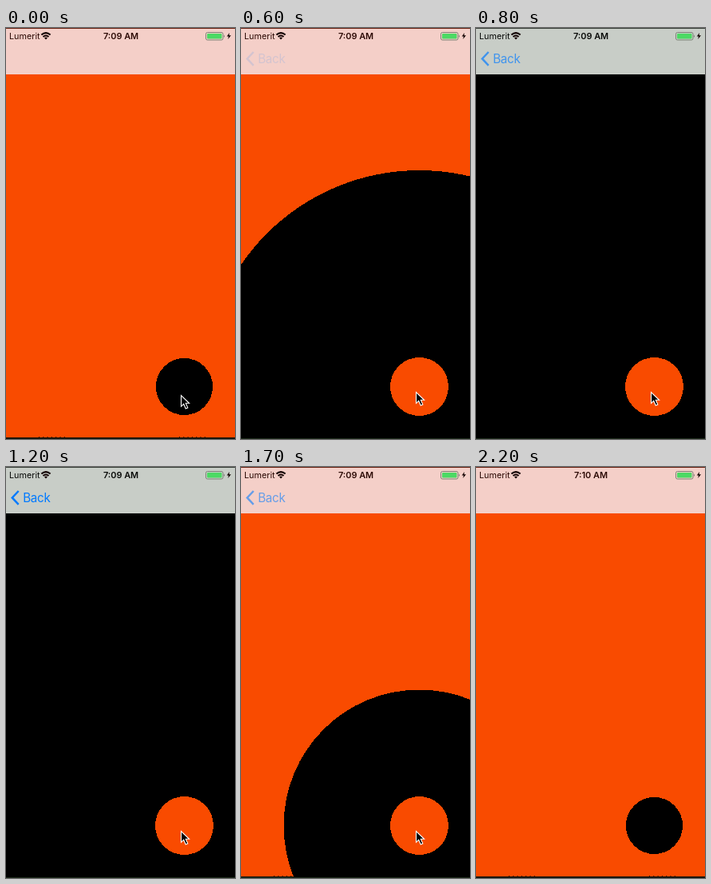
Animation, 287 px wide and 514 px high, one loop 2600 ms. Source, as an HTML page:

```html
<!DOCTYPE html>
<html lang="en">
<head>
<meta charset="utf-8">
<title>Circular reveal</title>
<style>
  html, body { margin: 0; width: 100%; height: 100%; overflow: hidden; background: #000; }
  svg { display: block; width: 100vw; height: 100vh; }
  text { font-family: Inter, "Liberation Sans", sans-serif; }
  .crisp { shape-rendering: crispEdges; }
</style>
</head>
<body>
<svg viewBox="0 0 287 514" preserveAspectRatio="none">
  <defs>
    <clipPath id="barClip"><rect width="287" height="58"/></clipPath>
    <filter id="soft" x="-10%" y="-10%" width="120%" height="120%"><feGaussianBlur stdDeviation="5"/></filter>
  </defs>

  <!-- Screens -->
  <rect width="287" height="514" fill="#f94b00"/>
  <path d="M41 511.5H74M217 511.5H250" stroke="#2a1000" stroke-dasharray="1 4.3"/>
  <rect y="512" width="287" height="2" fill="#1c160c"/>
  <circle id="reveal" class="crisp" cx="223.5" cy="448.5" r="35.6"/>
  <circle id="button" class="crisp" cx="223.5" cy="448.5" r="36.5" fill="#f94b00"/>
  <rect id="edge" y="513" width="287" height="1" fill="#1c2a1a"/>

  <!-- Translucent bar -->
  <g clip-path="url(#barClip)">
    <rect width="287" height="58" fill="#f4cfc8"/>
    <circle id="shade" cx="223.5" cy="448.5" r="0" fill="#c8cdc7" filter="url(#soft)"/>
  </g>
  <rect id="topLine" width="287" height="1" fill="#6b2415"/>

  <!-- Status bar -->
  <g id="status" fill="#2c0a05">
    <text x="4" y="14" font-size="10.8">Lumerit</text>
    <text id="clock" x="144" y="14" font-size="10.9" font-weight="600" text-anchor="middle">7:09 AM</text>
    <g fill="none" stroke="#100" stroke-width="2">
      <path d="M44.4 8.6Q50 3.6 55.6 8.6"/>
      <path d="M46.5 11Q50 8 53.5 11"/>
    </g>
    <path d="M48 12.3Q50 10.8 52 12.3L50 14.4Z" fill="#100"/>
    <rect x="250.5" y="5.5" width="21.5" height="9.5" rx="2" fill="none" stroke="#7d8376"/>
    <rect x="252" y="7" width="18.5" height="6.5" rx="1" fill="#4cd964"/>
    <path d="M273 8.4Q274.7 10.2 273 12Z" fill="#626258"/>
    <path d="M280 6L276.8 10.4H279L278.2 14L282 9.3H279.5Z" fill="#100"/>
  </g>

  <g id="back" fill="#007aff">
    <path d="M15.7 30L7.8 38.4L15.7 46.8" fill="none" stroke="#007aff" stroke-width="2.5"/>
    <text x="21.2" y="44" font-size="15.2" letter-spacing="-.3">Back</text>
  </g>

  <path id="cursor" d="M.5 .5V14.3L3.7 11.3L6.2 17L8.8 15.9L6.3 10.3H10.6Z" fill="#000" stroke="#fff" stroke-width="1.1"/>
</svg>
<script>
const LOOP = 2600, STEP = 100;
const el = id => document.getElementById(id);
const set = (id, name, value) => el(id).setAttribute(name, value);
const show = (id, on) => set(id, "visibility", on ? "visible" : "hidden");

// Linear value through [time, value] points, held beyond both ends.
function track(points, t) {
  if (t <= points[0][0]) return points[0][1];
  for (let i = 1; i < points.length; i++) {
    const [t0, a] = points[i - 1], [t1, b] = points[i];
    if (t <= t1) return a + (b - a) * (t - t0) / (t1 - t0);
  }
  return points[points.length - 1][1];
}

const radius = [[500, 35.6], [600, 270.5], [700, 460], [800, 530],
                [1500, 530], [1600, 390], [1700, 170], [1800, 35.6]];
const backAlpha = [[500, 0], [600, .13], [700, .42], [800, .68], [1000, .9], [1200, 1],
                   [1500, 1], [1600, .85], [1700, .58], [1800, .3], [1900, .12], [2000, .01], [2200, 0]];
const cursorX = [[0, 219], [100, 236], [200, 227], [300, 219]];
const cursorY = [[0, 459], [100, 423], [200, 440], [300, 455]];

function draw(ms) {
  const t = Math.floor(ms / STEP) * STEP;
  const r = track(radius, t);
  const open = t >= 600 && t < 1800;
  const dark = r > 500;
  set("reveal", "r", r);
  set("shade", "r", dark ? 560 : Math.max(0, r - 12));
  show("shade", r > 400);
  show("button", open);
  show("edge", open);
  set("topLine", "fill", dark ? "#3c423b" : "#6b2415");
  set("status", "fill", dark ? "#080a08" : "#2c0a05");
  set("back", "opacity", track(backAlpha, t));
  set("cursor", "transform", `translate(${track(cursorX, t)} ${track(cursorY, t)})`);
  show("cursor", t < 2000);
  el("clock").textContent = t < 2000 ? "7:09 AM" : "7:10 AM";
}

const start = performance.now();
function tick(now) {
  draw(Math.max(0, now - start) % LOOP);
  requestAnimationFrame(tick);
}
draw(0);
requestAnimationFrame(tick);
</script>
</body>
</html>
```
